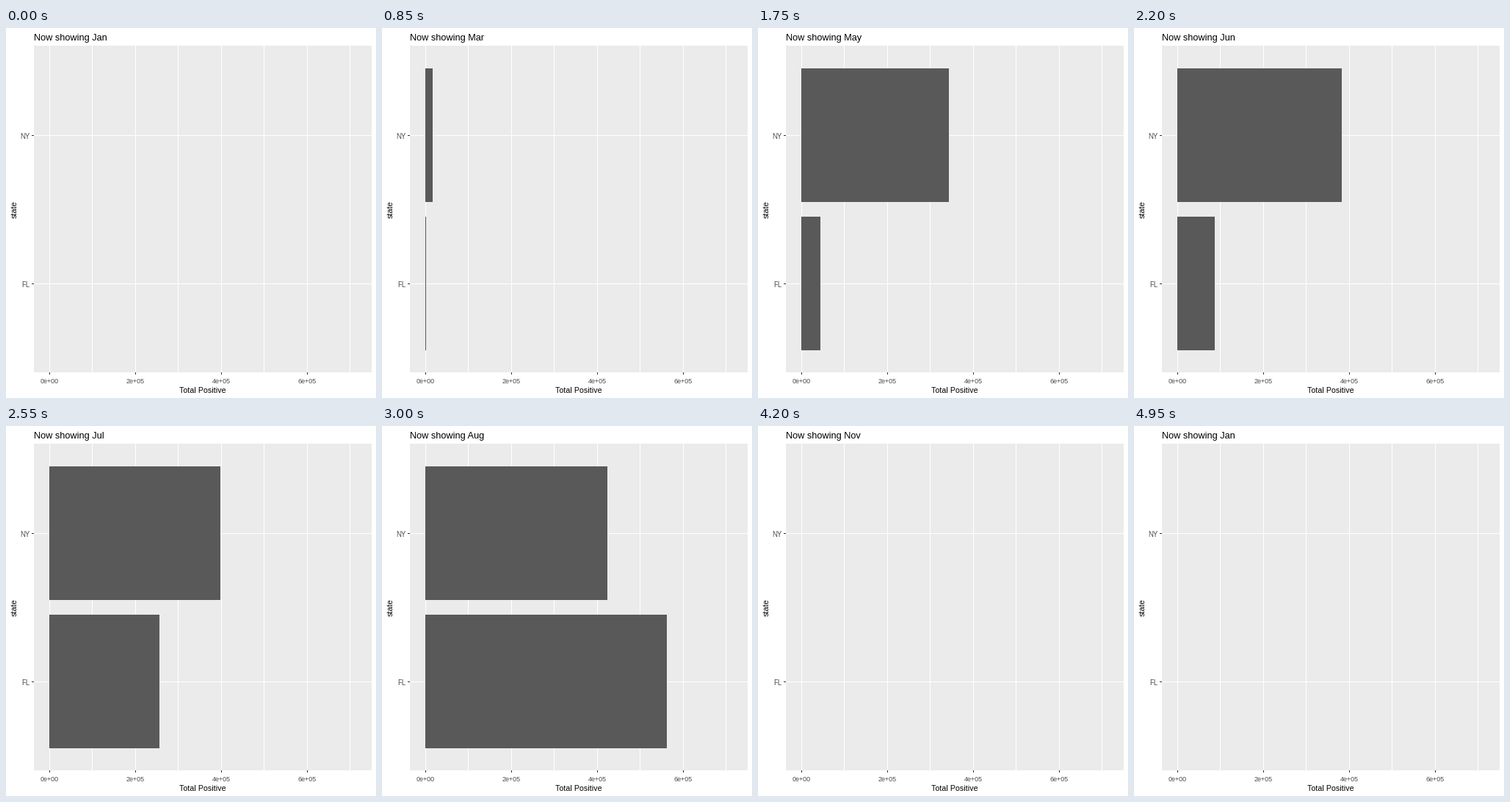
Write a matplotlib script that moves like this. It is 504 by 504 pixels and loops after 5 s.

```python
import matplotlib.pyplot as plt
from matplotlib.animation import FuncAnimation
from matplotlib.patches import Rectangle

SIZE, DPI = 504, 72
FRAMES, INTERVAL = 100, 50
STEPS = 4  # frames per transition

LEFT, TOP, RIGHT, BOTTOM = 38, 24, 498, 469
ZERO, PX_PER_THOUSAND = 59, 0.585
ROWS = {"NY": 146, "FL": 348}
BAR_HEIGHT = 182

MONTHS = "Jan Feb Mar Apr May Jun Jul Aug Sep Oct Nov Dec".split()
# Mean total positives in thousands: (NY, FL)
COUNTS = {
    "Mar": (16.4, 1.7),
    "Apr": (207, 20.5),
    "May": (343.6, 44.4),
    "Jun": (383, 87.2),
    "Jul": (403.5, 312.8),
    "Aug": (424, 562.4),
    "Sep": (445.5, 670),
    "Oct": (463.5, 714.5),
}

plt.rcParams["font.family"] = "Liberation Sans"
plt.rcParams["toolbar"] = "None"
fig = plt.figure(figsize=(SIZE / DPI, SIZE / DPI), dpi=DPI, facecolor="white")
ax = fig.add_axes([0, 0, 1, 1])
ax.set_xlim(0, SIZE)
ax.set_ylim(SIZE, 0)
ax.axis("off")


def box(x, y, width, height, color):
    return ax.add_patch(
        Rectangle((x, y), width, height, facecolor=color, linewidth=0, antialiased=False)
    )


def label(x, y, text, size, color="black", **kwargs):
    return ax.text(x, y, text, fontsize=size, color=color, va="baseline", **kwargs)


box(LEFT, TOP, RIGHT - LEFT, BOTTOM - TOP, "#EBEBEB")

for k in range(8):
    x = int(ZERO + 100 * k * PX_PER_THOUSAND)
    box(x, TOP, 1, BOTTOM - TOP, "white")
    if k % 2 == 0:
        box(x, BOTTOM, 1, 3, "#333333")
        label(x, 483.5, f"{k}e+0{5 if k else 0}", 9, "#4D4D4D", ha="center")

for state, y in ROWS.items():
    box(LEFT, y, RIGHT - LEFT, 1, "white")
    box(LEFT - 3, y, 3, 1, "#333333")
    label(33, y + 5, state, 9.7, "#4D4D4D", ha="right")

bars = [box(ZERO, y - BAR_HEIGHT // 2, 0, BAR_HEIGHT, "#595959") for y in ROWS.values()]
# Bars sit one pixel above or below the grid row depending on rounding
for bar, top in zip(bars, (55, 257)):
    bar.set_y(top)

title = label(37.6, 17, "", 12.8)
label(267.5, 497, "Total Positive", 10.6, ha="center")
label(15, 247.5, "state", 10.7, ha="center", rotation=90, rotation_mode="anchor")


def start(i):
    """First frame of the transition into month i; early pauses are a frame longer."""
    return 8 * i + min(i, 5) - 4


def update(frame):
    i = max((m for m in range(1, 13) if start(m) <= frame), default=0)
    t = min((frame - start(i) + 1) / STEPS, 1) if i else 1
    old, new = MONTHS[i - 1], MONTHS[i % 12]
    title.set_text("Now showing " + (new if t > 0.5 else old))

    before, after = COUNTS.get(old), COUNTS.get(new)
    if t == 1:
        values = after or (0, 0)
    elif before and after:
        values = [a + (b - a) * t for a, b in zip(before, after)]
    else:
        values = before or (0, 0)

    for bar, value in zip(bars, values):
        bar.set_width(round(value * PX_PER_THOUSAND))
        bar.set_visible(value > 0)
    return [title, *bars]


anim = FuncAnimation(fig, update, frames=FRAMES, interval=INTERVAL, repeat=True, repeat_delay=0)
plt.show()
```
